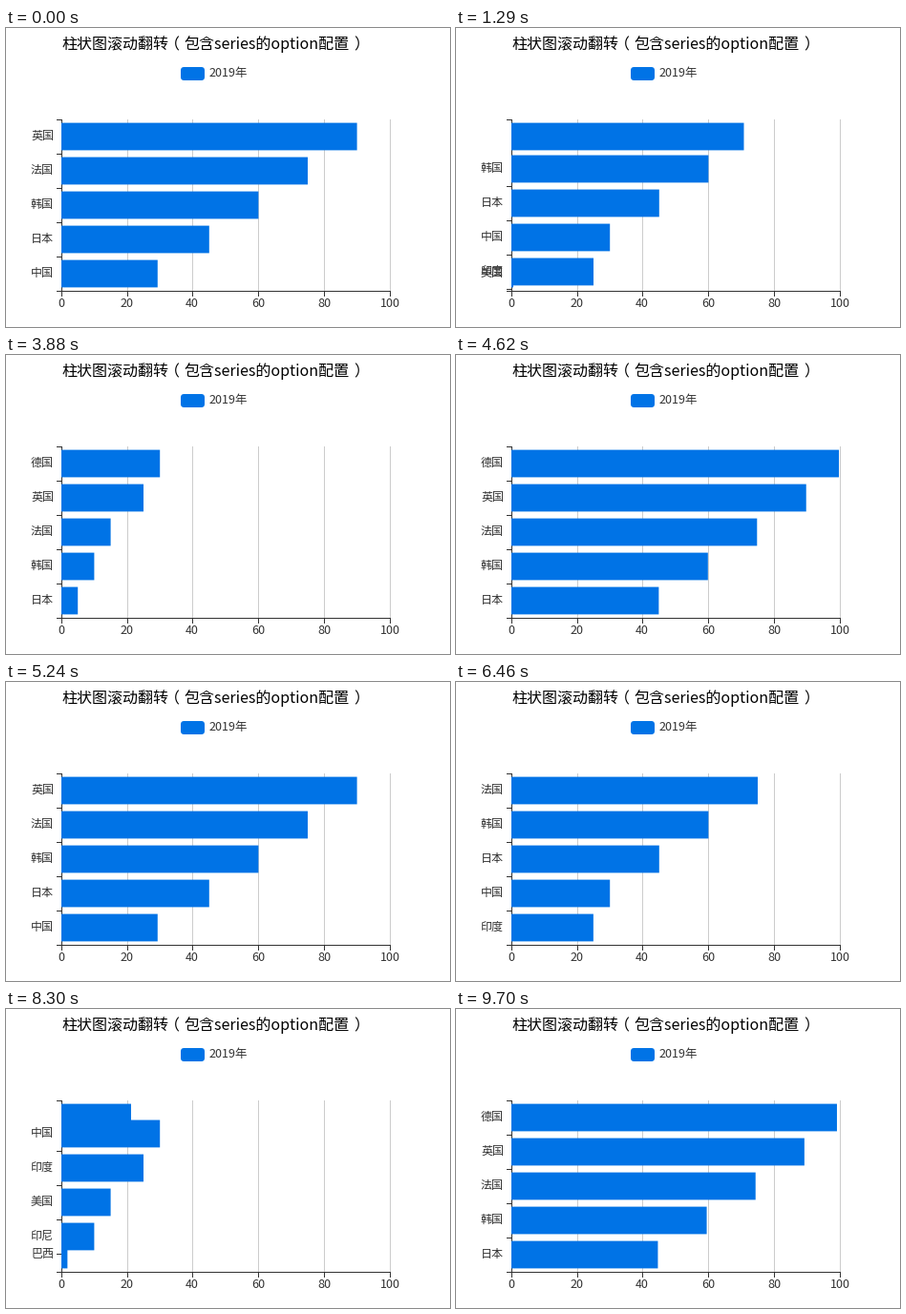
Animation, 465 px wide and 314 px high, one loop 9800 ms. Source, as a matplotlib script:

```python
import matplotlib.pyplot as plt
from matplotlib.animation import FuncAnimation
from matplotlib.patches import FancyBboxPatch, Rectangle

W, H, DPI = 465, 314, 100
LOOP, STEP = 9800, 20
BLUE, DARK, GRID = "#0073e6", "#333333", "#cccccc"

LEFT, TOP, BOTTOM, UNIT = 58, 96, 276, 3.44
SHOWN, BAND = 5, 36
BAR_H = BAND * 0.8
DIGIT_PX = 12.6

NAMES = ["德国", "英国", "法国", "韩国", "日本", "中国", "印度", "美国", "印尼", "巴西"]
VALUES = [100, 90, 75, 60, 45, 30, 25, 15, 10, 5]

# Moments at which the window of five rows scrolls on by one.
SCROLLS = [-472, 400, 1275, 2149, 3014, 3880, 4768, 5637, 6506, 7375, 8242, 9105]
WINDOWS = len(NAMES) - SHOWN + 1
SPEED = 1 / 0.872
LAST_CHANGE = 9700

plt.rcParams["font.family"] = "Noto Sans CJK JP"
fig = plt.figure(figsize=(W / DPI, H / DPI), dpi=DPI, facecolor="white")
ax = fig.add_axes([0, 0, 1, 1])
ax.set_xlim(0, W)
ax.set_ylim(H, 0)
ax.axis("off")


def box(x, y, w, h, color, z=1, snap=None):
    patch = Rectangle((x, y), w, h, facecolor=color, linewidth=0, zorder=z, snap=snap)
    return ax.add_patch(patch)


def label(x, y, text, px=12, color=DARK, ha="left"):
    return ax.text(x, y, text, fontsize=px * 72 / DPI, color=color,
                   ha=ha, va="baseline", zorder=4)


def cubic_out(ms):
    return 1 - (1 - min(ms / 300, 1)) ** 3


def expo_out(ms):
    return 1 if ms >= 1000 else 1 - 2 ** (-ms / 100)


# The brackets stand in the middle of their cells, so they are set apart.
for x, part in [(58.5, "柱状图滚动翻转"), (166, "（"),
                (186.5, "包含series的option配置"), (364.5, "）")]:
    label(x, 22, part, 16, "black")
ax.add_patch(FancyBboxPatch((183, 41), 25, 14, facecolor=BLUE, linewidth=0,
                            boxstyle="round,pad=0,rounding_size=3.5"))
label(213, 51, "2019年", DIGIT_PX)

for value in range(0, 101, 20):
    x = int(LEFT + value * UNIT + 0.25)
    if value:
        box(x, TOP, 1, BOTTOM - TOP, GRID)
    box(x, BOTTOM, 1, 6, DARK, 2)
    label(x, 293, str(value), DIGIT_PX, ha="center")
box(LEFT, TOP, 1, BOTTOM - TOP, DARK, 2)
box(LEFT, BOTTOM, 403 - LEFT, 1, DARK, 2)
box(LEFT - 5, TOP, 5, 1, DARK, 2)

bars = [box(LEFT, TOP, 0, BAR_H, BLUE, 3, False) for _ in NAMES]
ticks = [box(LEFT - 5, BOTTOM, 5, 1, DARK, 2, True) for _ in NAMES]
labels = [label(50, BOTTOM, name, ha="right") for name in NAMES]


def draw(i):
    t = min(i * STEP, LAST_CHANGE)
    turn = sum(start <= t for start in SCROLLS)
    ms = (t - SCROLLS[turn - 1]) * SPEED
    first, before = turn % WINDOWS, (turn - 1) % WINDOWS
    move, grow = cubic_out(ms), expo_out(ms)

    for k, value in enumerate(VALUES):
        new, old = k - first, k - before
        is_in, was_in = 0 <= new < SHOWN, 0 <= old < SHOWN
        if is_in and was_in:
            slot, size = old + (new - old) * move, 1
        elif is_in:
            slot, size = new, grow
        else:
            slot, size = old, (1 - move) * was_in

        y = TOP + slot * BAND
        bars[k].set_y(y + (BAND - BAR_H) / 2)
        bars[k].set_width(value * UNIT * size)
        bars[k].set_visible(size > 0)
        ticks[k].set_y(round(y + BAND))
        ticks[k].set_visible(is_in)
        labels[k].set_y(y + 21)
        labels[k].set_visible(is_in)
    return bars + ticks + labels


anim = FuncAnimation(fig, draw, frames=LOOP // STEP, interval=STEP,
                     repeat=True, repeat_delay=0, blit=False)
plt.show()
```
